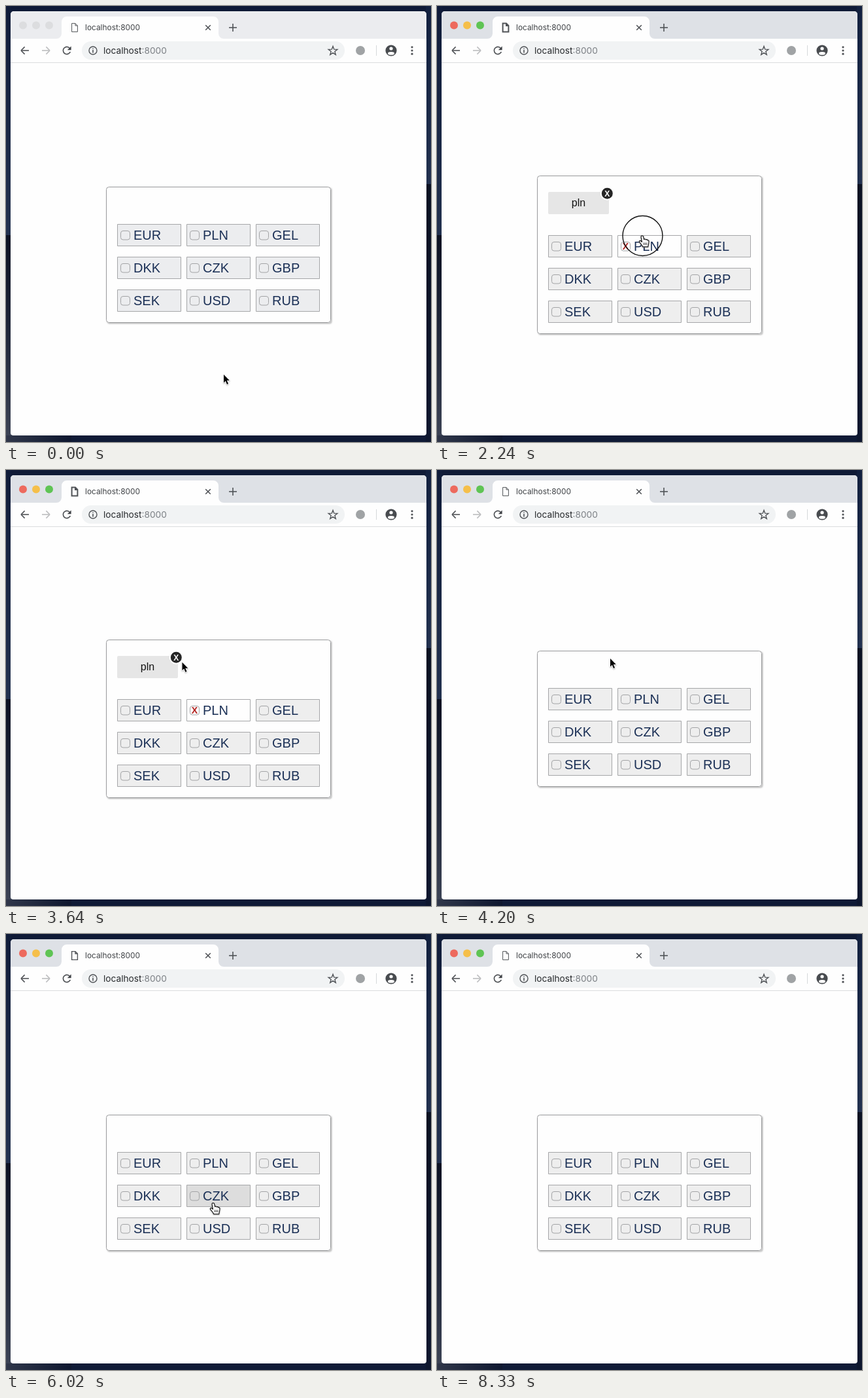
An HTML page with a canvas that plays this animation: 650x666 px, repeating every 8400 ms.

```html
<!DOCTYPE html>
<html lang="en">
<head>
<meta charset="utf-8">
<title>Currency picker</title>
<style>
html, body { margin: 0; width: 100%; height: 100%; overflow: hidden; background: #0d1730; }
canvas { display: block; width: 650px; height: 666px; }
</style>
</head>
<body>
<canvas id="stage" width="650" height="666"></canvas>
<script>
const ctx = document.getElementById('stage').getContext('2d');
const LOOP = 8400, STEP = 70;
const HOLD = 140, GLIDE = 350, REST = 140;
const HIDE_FROM = 8190;
const SANS = '"Liberation Sans", Arial, sans-serif';
const UI = 'Inter, Roboto, sans-serif';
const PAPER = '#fefefe', INK = '#505357';
const CODES = ['EUR', 'PLN', 'GEL', 'DKK', 'CZK', 'GBP', 'SEK', 'USD', 'RUB'];
const CELL = { w: 98, h: 34, dx: 106, dy: 50 };
const NONE = -1;

const spot = (x, y, code = NONE) => ({ x, y, code });
const blank = spot(332, 562), tag = spot(264, 287);
const pln = spot(314, 351, 1), plnEdge = spot(307, 342, 1);
const czk = spot(317, 405, 4), czkLow = spot(317, 411, 4);
const press = (at, where) => ({ at, where });
const CLICKS = [
  press(770, blank), press(1330, pln), press(2240, pln), press(3080, plnEdge), press(3850, tag),
  press(4970, czk), press(5880, czkLow), press(6440, czkLow), press(7980, tag)
];
const FOCUS_AT = CLICKS[0].at + HOLD / 2;

// The pointer glides to each click and rests there briefly before pressing.
function pointer(t) {
  let { x, y } = blank;
  for (const { at, where } of CLICKS) {
    const k = Math.max(0, Math.min(1, (t - at + REST + GLIDE) / GLIDE));
    const ease = k * k * (3 - 2 * k);
    x += (where.x - x) * ease;
    y += (where.y - y) * ease;
  }
  return { x, y };
}

// Each click takes effect on release; clicking the ticked code clears it.
function pickedAt(t) {
  return CLICKS.filter(c => t >= c.at + HOLD)
    .reduce((now, c) => now === c.where.code ? NONE : c.where.code, NONE);
}

function paint(fill, stroke, width = 1) {
  if (fill) { ctx.fillStyle = fill; ctx.fill(); }
  if (stroke) { ctx.strokeStyle = stroke; ctx.lineWidth = width; ctx.stroke(); }
}
function box(x, y, w, h, r, fill, stroke) {
  ctx.beginPath();
  ctx.roundRect(x, y, w, h, r);
  paint(fill, stroke);
}
function disc(x, y, r, fill, stroke, width) {
  ctx.beginPath();
  ctx.arc(x, y, r, 0, Math.PI * 2);
  paint(fill, stroke, width);
}
function line(x0, y0, x1, y1, color = INK, width = 1.6) {
  ctx.beginPath();
  ctx.moveTo(x0, y0);
  ctx.lineTo(x1, y1);
  paint(null, color, width);
}
function text(str, x, y, font, color, align = 'left') {
  ctx.font = font;
  ctx.fillStyle = color;
  ctx.textAlign = align;
  ctx.fillText(str, x, y);
}
function fade(x, y, w, h, from, to) {
  const g = w > h ? ctx.createLinearGradient(x, 0, x + w, 0) : ctx.createLinearGradient(0, y, 0, y + h);
  g.addColorStop(0, from);
  g.addColorStop(1, to);
  ctx.fillStyle = g;
  ctx.fillRect(x, y, w, h);
}

function desktop() {
  ctx.fillStyle = '#0f1a36';
  ctx.fillRect(0, 0, 650, 666);
  fade(0, 0, 8, 350, '#101c39', '#22314f');
  fade(0, 350, 8, 130, '#0b1122', '#1c2336');
  fade(0, 480, 8, 186, '#1c2336', '#3d4456');
  fade(642, 0, 8, 272, '#12203f', '#22314f');
  fade(642, 272, 8, 394, '#0a1122', '#0e172f');
  fade(0, 656, 100, 10, '#30374a', '#0e172f');
}

function navArrow(x, dir, color) {
  line(x - 6 * dir, 68, x + 6 * dir, 68, color);
  for (const s of [-1, 1]) line(x + 6 * dir, 68, x + 0.4 * dir, 68 + 5.6 * s, color);
}

function tabBar(active) {
  box(7, 8, 636, 648, [5, 5, 4, 4], PAPER);
  box(7, 8, 636, 42, [5, 5, 0, 0], active ? '#dee1e6' : '#ebecef');
  const lights = active ? ['#ed6a5e', '#f5bf4a', '#5fc454'] : Array(3).fill('#dcdddf');
  lights.forEach((c, i) => disc(26 + 20 * i, 29.5, 6, c));

  ctx.beginPath();
  ctx.moveTo(77, 50);
  ctx.arcTo(85, 50, 85, 42, 8);
  ctx.arcTo(85, 16, 93, 16, 8);
  ctx.arcTo(325, 16, 325, 24, 8);
  ctx.arcTo(325, 50, 333, 50, 8);
  ctx.lineTo(333, 50);
  paint(PAPER);

  ctx.stroke(new Path2D('M106 26.6H100.6V39.4H109.4V30ZV30H109.4'));
  text('localhost:8000', 121, 37.2, '11.9px ' + UI, '#3f4246');
  for (const s of [-1, 1]) line(309 - 3.8, 33 - 3.8 * s, 309 + 3.8, 33 + 3.8 * s);
  line(341, 33, 353, 33);
  line(347, 27, 347, 39);
}

function toolbar() {
  line(7, 86.5, 643, 86.5, '#dcdddf', 1);
  navArrow(29, -1, INK);
  navArrow(61, 1, '#bcbdbf');
  ctx.beginPath();
  ctx.arc(93, 68, 5.6, 0.35, Math.PI * 1.76);
  paint(null, INK, 1.7);
  ctx.fill(new Path2D('M99.6 61.4v5.8h-5.8z'));

  box(116, 54, 402, 28, 14, '#f1f3f4');
  disc(133, 68, 6, null, INK, 1.4);
  line(133, 67, 133, 71.4);
  line(133, 64.4, 133, 65.8);
  const font = '13.7px ' + UI;
  text('localhost', 149, 73, font, '#26292c');
  text(':8000', 149 + ctx.measureText('localhost').width, 73, font, '#7b7f84');

  ctx.beginPath();
  for (let i = 0; i < 10; i++) {
    const a = -Math.PI / 2 + i * Math.PI / 5, r = i % 2 ? 3 : 7.2;
    ctx.lineTo(500 + r * Math.cos(a), 68.6 + r * Math.sin(a));
  }
  ctx.closePath();
  paint(null, INK, 1.4);

  disc(542, 68, 7, '#a0a3a5');
  line(566.5, 60, 566.5, 76, '#d6d8da', 1);
  disc(589, 68, 8.6, '#484b4f');
  disc(589, 65, 2.6, PAPER);
  ctx.beginPath();
  ctx.ellipse(589, 72.4, 5, 2.3, 0, 0, Math.PI * 2);
  paint(PAPER);
  for (let i = -1; i <= 1; i++) disc(621, 68 + 5.2 * i, 1.6, INK);
}

function cellAt(i, shift) {
  return { x: 170 + CELL.dx * (i % 3), y: 333 + shift + CELL.dy * Math.floor(i / 3) };
}
function inside(p, c) {
  return p.x >= c.x && p.x < c.x + CELL.w && p.y >= c.y && p.y < c.y + CELL.h;
}

function panel(picked, shift, p, active) {
  ctx.save();
  ctx.shadowColor = 'rgba(0,0,0,.25)';
  ctx.shadowBlur = 2;
  ctx.shadowOffsetX = ctx.shadowOffsetY = 1.5;
  box(153, 276 - shift, 344, 208 + 2 * shift, 4, PAPER);
  ctx.restore();
  box(153.5, 276.5 - shift, 343, 207 + 2 * shift, 4, PAPER, '#999a9c');

  CODES.forEach((code, i) => {
    const c = cellAt(i, shift), on = i === picked;
    const over = active && inside(p, c);
    const fill = on ? PAPER : over ? '#ddd' : active ? '#eee' : '#ecedef';
    box(c.x + 0.5, c.y + 0.5, CELL.w - 1, CELL.h - 1, 0, fill, '#a5a6a8');
    box(c.x + 5.5, c.y + 10.5, 14, 13.5, 3.5, on ? PAPER : null, '#a3a4a6');
    if (on) text('X', c.x + 12.5, c.y + 22, 'bold 14px ' + SANS, '#b3221f', 'center');
    text(code, c.x + 25, c.y + 24, '20px ' + SANS, '#1b3056');
  });

  if (picked === NONE) return;
  box(170, 284, 93, 34, 2, '#e6e6e6');
  text(CODES[picked].toLowerCase(), 216.5, 306, '16px ' + SANS, '#111', 'center');
  disc(260.3, 286.3, 9.5, '#262626', PAPER, 2);
  text('X', 260.3, 290.5, 'bold 12px ' + SANS, PAPER, 'center');
}

const ARROW = new Path2D('M1 1V13.4L3.8 10.8L6 16L8 15.1L5.8 10.1H9.8Z');
const HAND = new Path2D('M-2 1.6C-2-.6 1.3-.6 1.7 1.4L2.6 5.6C3.4 4.6 5 4.8 5.3 6C6.2 5.2 7.6 5.6 7.9 6.8' +
  'C9 6.3 10 7.2 10 8.4C10.2 11.5 9.2 13 8.8 16.8H.6C.2 14.6-2.4 12.6-4.4 9.6C-5.3 8-3.6 6.8-2.2 8L-.6 9.4Z');

function cursor(p, hand) {
  const shape = hand ? HAND : ARROW;
  ctx.save();
  ctx.translate(p.x, p.y);
  ctx.lineJoin = 'round';
  ctx.shadowColor = 'rgba(0,0,0,.3)';
  ctx.shadowBlur = 2;
  ctx.shadowOffsetY = 1;
  ctx.lineWidth = 1.6;
  ctx.strokeStyle = '#fff';
  ctx.stroke(shape);
  ctx.shadowColor = 'transparent';
  ctx.fillStyle = hand ? '#fff' : '#000';
  ctx.fill(shape);
  if (hand) {
    ctx.lineWidth = 1.2;
    ctx.strokeStyle = '#111';
    ctx.stroke(HAND);
    for (let i = 0; i < 3; i++) line(2.4 + 2.2 * i, 10.5, 2.4 + 2.2 * i, 14, '#222', 0.9);
  }
  ctx.restore();
}

function draw(t) {
  const p = pointer(t), active = t >= FOCUS_AT;
  const picked = pickedAt(t), shift = picked === NONE ? 0 : CELL.h / 2;

  desktop();
  tabBar(active);
  toolbar();
  panel(picked, shift, p, active);
  if (t >= HIDE_FROM) return;

  if (CLICKS.some(c => t >= c.at && t < c.at + HOLD)) disc(p.x + 0.5, p.y, 30.5, null, '#111', 1.4);
  const onTag = picked !== NONE && Math.hypot(p.x - 260, p.y - 286) < 10;
  const onCell = CODES.some((_, i) => inside(p, cellAt(i, shift)));
  cursor(p, active && (onTag || onCell));
}

const start = performance.now();
function tick() {
  const t = (performance.now() - start) % LOOP;
  ctx.strokeStyle = INK;
  draw(Math.floor(t / STEP) * STEP);
  requestAnimationFrame(tick);
}
tick();
</script>
</body>
</html>
```
